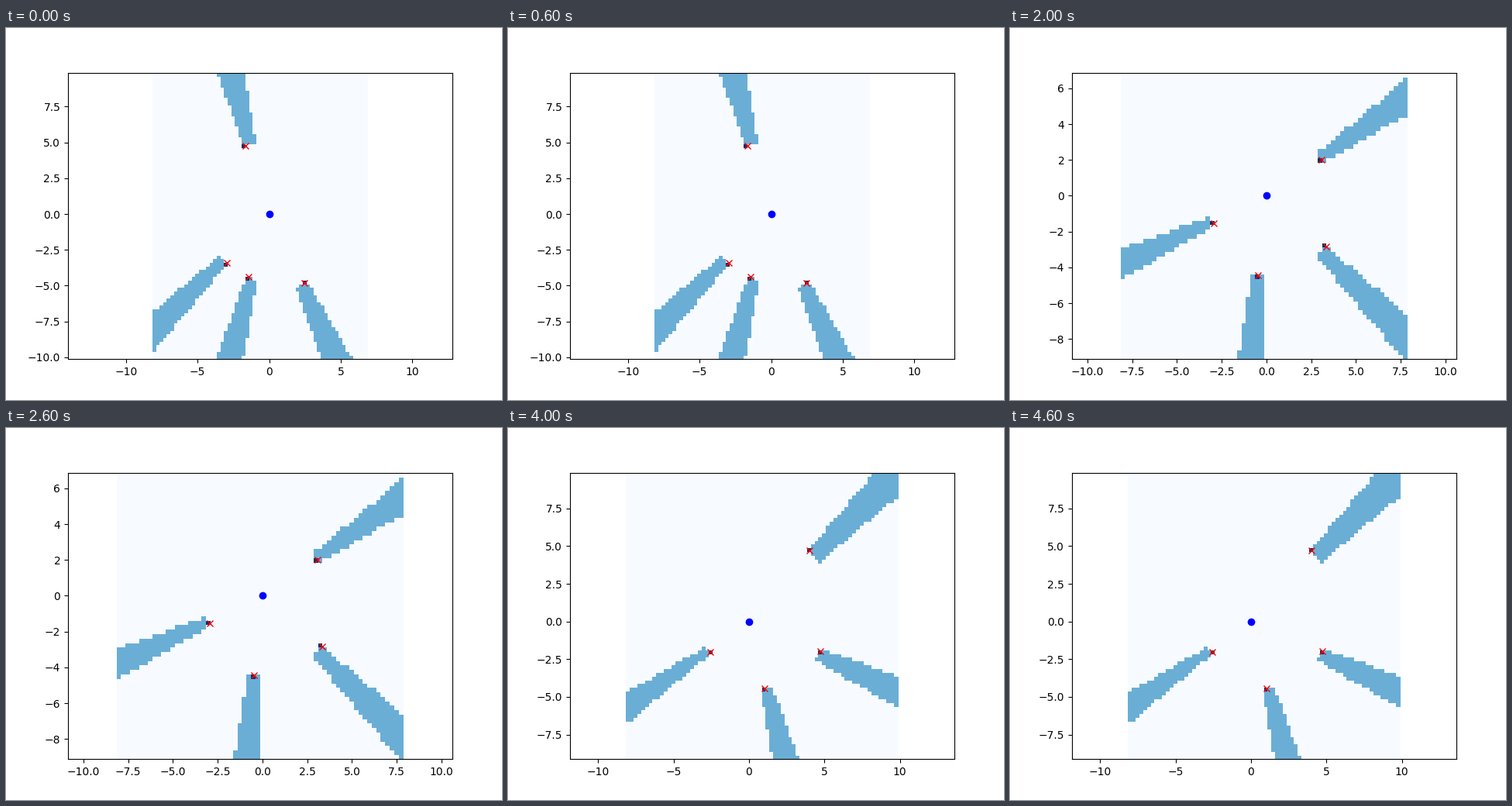
Recreate the animation shown at these times as a matplotlib script. Size 640 px wide and 480 px high, loop 5000 ms.

```python
"""Ray casting grid maps built from a few obstacle points around a sensor."""
import math

import matplotlib.pyplot as plt
import numpy as np
from matplotlib.animation import FuncAnimation

CELL = 0.25
SECTOR = np.deg2rad(10.0)
MARGIN = 5.0
FREE, HIDDEN, HIT = 0.0, 0.5, 1.0

# Four obstacles per scan, as x + yj relative to the sensor
SCANS = [
    (-1.65 + 4.74j, -2.93 - 3.41j, -1.42 - 4.405j, 2.48 - 4.82j),
    (-4.15 + 2.43j, -2.59 + 1.43j, -2.72 - 3.70j, -1.82 - 3.59j),
    (3.10 + 1.99j, -2.96 - 1.52j, -0.45 - 4.42j, 3.35 - 2.86j),
    (0.69 + 1.39j, 4.22 + 2.76j, 1.50 - 1.47j, 3.45 - 1.57j),
    (4.03 + 4.69j, -2.56 - 2.04j, 1.05 - 4.46j, 4.75 - 1.95j),
]


def sector(z):
    """Index of the angular sector holding z."""
    angle = np.angle(z)
    return np.floor(np.where(angle < 0, angle + 2 * math.pi, angle) / SECTOR)


def cell_centres(values):
    """Cell centres covering the values plus a margin."""
    low = round(min(values) - MARGIN)
    high = round(max(values) + MARGIN)
    return np.arange(low, high, CELL)


def edges(centres):
    return np.append(centres, centres[-1] + CELL) - CELL / 2


def cast_rays(points):
    """Mark each obstacle and hide the rest of its sector behind it."""
    xs, ys = cell_centres(points.real), cell_centres(points.imag)
    cells = xs + 1j * ys[:, None]
    dist, sect = abs(cells), sector(cells)
    grid = np.full(cells.shape, FREE)
    for p in points:
        grid[(sect == sector(p)) & (dist > abs(p))] = HIDDEN
        grid[round((p.imag - ys[0]) / CELL), round((p.real - xs[0]) / CELL)] = HIT
    return edges(xs), edges(ys), grid


fig, ax = plt.subplots(figsize=(6.4, 4.8), dpi=100)


def draw(i):
    points = np.array(SCANS[i])
    ax.cla()
    ax.pcolor(*cast_rays(points), vmin=FREE, vmax=HIT, cmap="Blues")
    ax.axis("equal")
    ax.plot(points.real, points.imag, "xr")
    ax.plot(0.0, 0.0, "ob")


anim = FuncAnimation(fig, draw, frames=len(SCANS), interval=1000,
                     repeat=True, repeat_delay=0)
plt.show()
```
